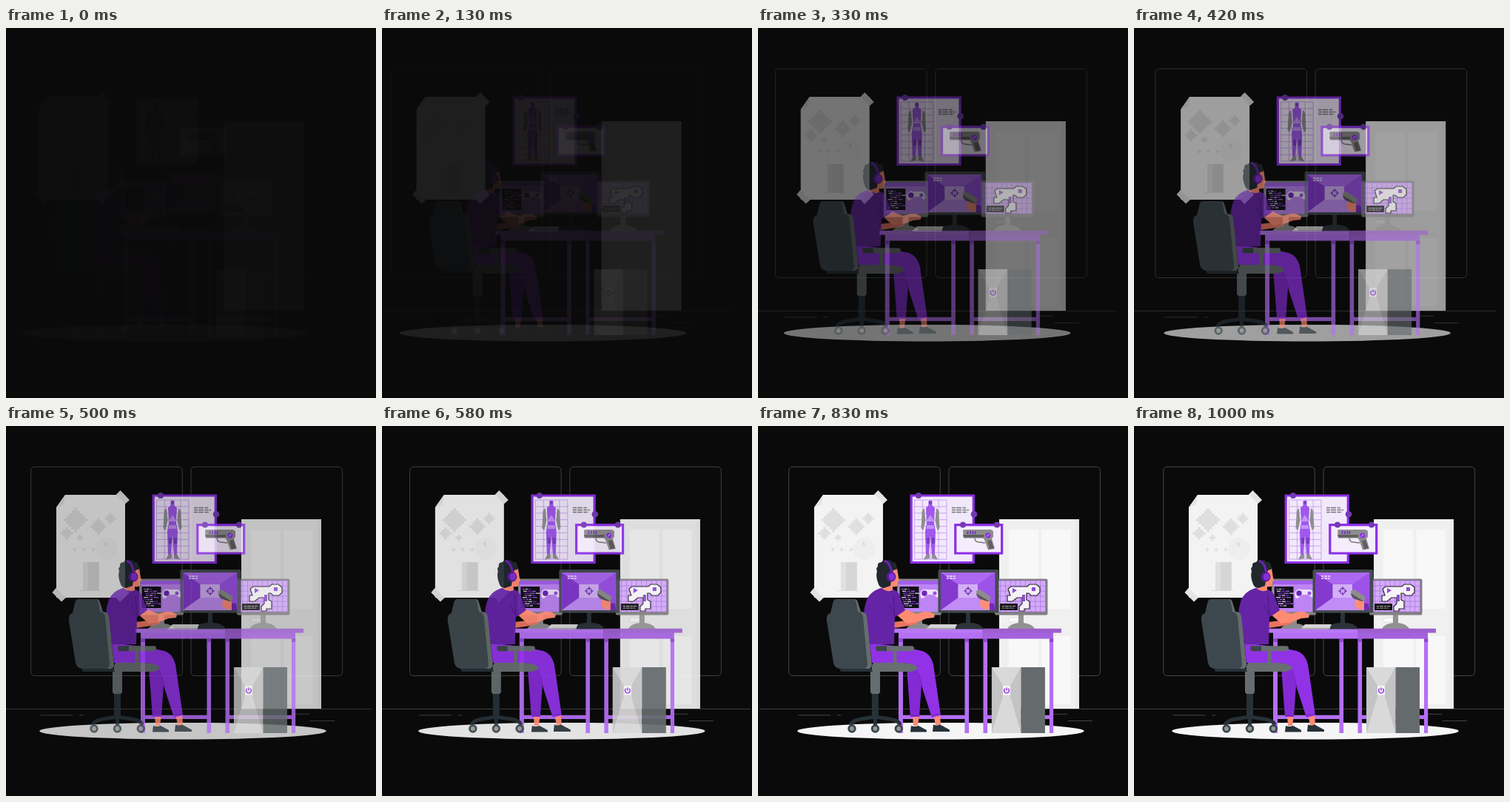
An HTML page that plays this animation: 500 px wide and 500 px high, repeating every 1040 ms.

```html
<!DOCTYPE html>
<html lang="en">
<head>
<meta charset="utf-8">
<title>Game designer at work</title>
<style>
html, body { margin: 0; width: 100%; height: 100%; overflow: hidden; background: #0a0a0a; }
svg { display: block; width: 100vw; height: 100vh; }
</style>
</head>
<body>
<svg viewBox="0 0 500 500">
  <g class="part" fill="none" stroke="#4c4c4c" stroke-width=".9">
    <rect x="39.7" y="55.2" width="204.6" height="282.3" rx="5"/>
    <rect x="256" y="55.2" width="204.6" height="282.3" rx="5"/>
    <path d="M0 382.4H500M52.5 390.8H96M105 390.8H110.5M396 389.3H416M417 398.5H450"/>
  </g>

  <ellipse class="part" cx="245" cy="412.2" rx="193.8" ry="11.3" fill="#f5f5f5"/>

  <g class="part">
    <path fill="#f0f0f0" d="M324 126H432V382H324Z"/>
    <path fill="#ebebeb" d="M427 126h5V382h-5Z"/>
    <path fill="#f8f8f8" d="M337 140.5h40V247H337ZM381.500 140.5H420.500V247H381.500ZM337 284h40v92H337ZM381.500 284H420.500v92H381.500Z"/>
    <path fill="#fafafa" stroke="#dedede" stroke-width=".8" d="M338 259h10q4 0 4 3t-4 3h-10q-3-3 0-6Z"/>
  </g>

  <g class="part">
    <path fill="#f3f3f3" d="M86 93H167V232H74V110Z"/>
    <path fill="#e4e4e4" d="M86 93L84 106 74 110Z"/>
    <g id="sprites" fill="#dfdfdf"></g>
    <circle cx="142" cy="166" r="15" fill="#eeeeee"/>
    <path fill="none" stroke="#d2d2d2" d="M143 157.500h-3v2h2v2h-3"/>
    <path fill="#e0e0e0" d="M110 184h22v38H110Z"/>
    <path fill="#d6d6d6" d="M117 184h14.500v38H117ZM105 222h29v.8h-29Z"/>
    <path fill="#e4e4e4" d="M155 92.500l5.500-5.500 12.500 13-5.500 5ZM68.500 225l5-6 13.500 13-6 5.500ZM155 232l12-13 6 6-13 13Z"/>
  </g>

  <g class="part">
    <path fill="#f2e8fb" stroke="#8b2fe6" stroke-width="3.200" d="M205.200 94H289.300V184.500H205.200Z"/>
    <g id="chart" stroke="#b98bea" stroke-width=".7"></g>
    <path stroke="#777" stroke-width="1.700" stroke-dasharray="5 1 7 1.500" d="M260 110.500h19M260 113.500h23M260 116.500h21"/>
    <g fill="#8f8f8f">
      <path d="M223 111q-4 2-3.500 10l-1 17 3 3 3-13ZM239 111q4 2 3.500 10l1 17-3 3-3-13ZM226 173h4v6l-8 1.500ZM233 173h4l4 7.500-8-1.500Z"/>
    </g>
    <path fill="#9f57ec" d="M228.500 101.500q2.500-2 5 0v6l3.500 3-1 20 2 12-1 31h-4l-2-26-2 26h-4l-1-31 2-12-1-20 3.500-3Z"/>
    <path fill="#c292f5" d="M231 120l6 9h-12ZM226 134h10v5h-10Z"/>
    <path fill="#7a3cc0" d="M226 151h4v8h-4ZM233 151h4v8h-4ZM229 102h4v3h-4Z"/>
    <circle cx="215" cy="94" r="4" fill="#733ab4"/><circle cx="290" cy="119.300" r="4.300" fill="#733ab4"/>
  </g>

  <g class="part">
    <path fill="#f5ecfc" stroke="#8b2fe6" stroke-width="3.200" d="M264.800 133.700H327.700V172H264.800Z"/>
    <path fill="#8d8d8d" d="M275 141l2-1h36l3 2v8l-2 2 4 14-9 1.500-5-14-2-2H276Z"/>
    <path fill="#5f5f5f" d="M275 147h28v3.500h-27ZM308 155l5-1 4 11-6 1.500Z"/>
    <path fill="none" stroke="#777" stroke-width="1.400" d="M291 151q0 6 6 6l8 1"/>
    <path stroke="#7427c4" stroke-width="1.500" d="M281 146l1-4M284.500 146l1-4M288 146l1-4M291 146l1-4"/>
    <circle cx="308.800" cy="147.800" r="3.600" fill="#8b2fe6"/>
    <path stroke="#eadafa" d="M307 149.500l3.500-3.500"/>
    <circle cx="275" cy="133.500" r="4" fill="#733ab4"/><circle cx="321" cy="133.500" r="4" fill="#733ab4"/>
  </g>

  <g class="part">
    <path fill="#8b8b8b" d="M212 254h8v13q10 1 14 7h-36q4-6 14-7Z"/>
    <rect x="186" y="206.500" width="60" height="49" rx="2" fill="#858585"/>
    <path fill="#bd85f3" d="M188 209h57v42h-57Z"/>
    <path fill="#a55ff0" d="M188 209h57v5h-57Z"/>
    <path fill="#111016" d="M189.500 217h26v29h-26Z"/>
    <g id="code" stroke-width="1.300"></g>
    <path fill="#eee1fa" d="M218 224q3-5 8-3h10q6-1 8 9l-3 2-6-4h-8l-6 5q-5 0-3-9Z"/>
    <circle cx="223" cy="226" r="3.700" fill="#6d25b9"/><circle cx="237" cy="226" r="2.500" fill="#9c50e5"/>
  </g>

  <g class="part">
    <path fill="#919191" d="M350 254h7v12q11 1 15 8h-37q4-7 15-8Z"/>
    <rect x="318" y="206.500" width="71.500" height="49" rx="2" fill="#818181"/>
    <path fill="#d3abf8" d="M319 209h67.500v42H319Z"/>
    <g id="grid" stroke="#a367df" stroke-width=".6"></g>
    <path fill="#f6f3f8" stroke="#2c2632" stroke-width="1.200" d="M336 220l4-3h22l3-3h9l5 4v7l-4 4h-8l-3-3h-3v9l4 2v10h-7v3h-7v-6l4-4v-8h-7l-6 5h-7v-8h4Z"/>
    <path fill="#8c4bd0" d="M342 219l6 3-6 4ZM355 228h4v9h-4ZM368 218h5v5h-5Z"/>
    <path fill="#171419" d="M325 240h24v9h-24Z"/>
    <path stroke="#aaa" stroke-dasharray="3 1 5 1" d="M328 243.500h18M328 246h16"/>
  </g>

  <g class="part">
    <path fill="#b46ff4" d="M188 279h114v8.500H188ZM188 287h6v128h-6ZM277.500 287h5.600v128h-5.600ZM302.500 287h5.600v128h-5.600ZM392 287h5.200v128H392ZM194 390.700h84v5.300h-84ZM308 390.700h84v5.300h-84Z"/>
    <path fill="#9149d2" d="M188 287h6v5h-6ZM277.500 287h5.600v5h-5.600ZM302.500 287h5.600v5h-5.600ZM392 287h5.200v5H392Z"/>
    <path fill="#a461dd" d="M302 279h95v8.500h-95Z"/>
    <path fill="#b878f4" d="M180.500 273.700H302v5.800H180.500Z"/>
    <path fill="#9d60cf" d="M302 273.700H408v5.800H302Z"/>
  </g>

  <g class="part">
    <path fill="#2b3339" d="M279 251h6v15q14 0 18 8.500h-42q4-8.500 18-8.500Z"/>
    <rect x="241.500" y="194" width="82" height="58.500" rx="2" fill="#444a4f"/>
    <path fill="#9d52e9" d="M245 198h73.500v51H245Z"/>
    <path fill="#8439cf" d="M245 198l23.500 16v18L245 249Z"/>
    <path fill="#ad68f1" d="M245 198h73.500L295 214h-26.500Z"/>
    <path fill="#c18cf5" d="M245 249l23.500-17H295l23.500 17Z"/>
    <path fill="#d2b0f5" d="M268.500 214H295v18h-26.500Z"/>
    <path stroke="#eee2fa" stroke-width="1.500" stroke-dasharray="3 1 4 1" d="M253 203h13M253 206h13"/>
    <g fill="none" stroke="#6f2ab5" stroke-width="1.200"><circle cx="282" cy="223" r="3.700"/><path d="M282 217v4.500M282 224.500v4.500M276 223h4.500M283.500 223h4.500"/></g>
    <path fill="#8d8d8d" d="M293 223l5-2 15 10-3 8-5 1-11-11Z"/>
    <path fill="#555" d="M293 226l16 10-2 4-13-10Z"/>
    <path fill="#ff8e78" d="M299 234l6 2 7 2 1 10h-9l-6-5Z"/>
    <path fill="#742ab9" d="M311 239l6 1 1.500 9H311Z"/>
  </g>

  <g class="part">
    <path fill="#d4d4d4" d="M231 268h36l-3 6.500h-39Z"/>
    <path fill="#a0a0a0" d="M225 273h40v1.500h-40Z"/>
  </g>

  <g class="part">
    <path fill="#d9d9d9" d="M314 326h39.500v89H314Z"/>
    <path fill="#c4c4c4" d="M314 326l15 25v14L314 415ZM353.500 326L339 351v14l14.500 50Z"/>
    <path fill="#656b6d" d="M353.500 326H386v89h-32.500Z"/>
    <path fill="#f8f4fb" d="M329 351h10v12.500h-10Z"/>
    <path fill="none" stroke="#8b2fe6" stroke-width="1.400" d="M332 354.700a3.400 3.400 0 1 0 4 0M334 353.500v4"/>
  </g>

  <g class="part">
    <!-- chair base -->
    <path fill="#263138" d="M152 360h9v34h-9Z"/>
    <path fill="none" stroke="#263138" stroke-width="5" d="M123 404q2-6 14-8l19-3 20 3q13 2 14 8M156.500 392v13"/>
    <g fill="#8f9799" stroke="#3b4449" stroke-width="2.800"><circle cx="125" cy="409" r="4.300"/><circle cx="156.500" cy="409" r="4.300"/><circle cx="188.300" cy="409" r="4.300"/></g>
    <path fill="#656d6f" d="M150 331h13v29l-2 2h-9l-2-2Z"/>
    <!-- legs -->
    <path fill="#ff8b73" d="M207 391h9l-2 14h-6ZM235 389h9l1 15h-7Z"/>
    <path fill="#263138" d="M205 405q5 2 10 0l11 6v2.500h-22ZM235 403.500q5 2 9 0l13 7v2.500h-23Z"/>
    <path fill="#842ad4" d="M183 310l25 5 12 21-4 57h-12l-5-67Z"/>
    <path fill="#9132e7" d="M149 293l48 6 23 5q11 3 15 18l10 69-12 3-20-62-15-12h-46Z"/>
    <path fill="none" stroke="#6d20b3" d="M198 320q14 4 18 17l4 16M205 391l11 1M232 391.500l12-2.500"/>
    <!-- arms and torso -->
    <path fill="#e97462" d="M181 265l16-2 14 1 3 3-12 3-20 3Z"/>
    <path fill="#ff8b73" d="M183 253l12-6 17 7 10-3h8l7 4-1 4-10 1-13 5-14 2Z"/>
    <path fill="#6424a5" d="M164 219q-16 5-20 19-5 15-1 30l7 27h32l1-37 4-2 10-7-8-21q-2-5-10-8Z"/>
    <path fill="none" stroke="#50188b" d="M181 229l2 28M175 241l8 15"/>
    <!-- head -->
    <path fill="#ff8b73" d="M169 208l10-18 7 2 2 13 1 4-2 1v5q-1 3-7 2v5q-7 3-14-2Z"/>
    <path fill="#20282e" d="M160 211q-3-8-1-15-2-4 1-6-1-6 5-6 2-4 7-2 5-3 7 2 6-1 6 5l2 4-6 2-2 8-2 13-9 3q-6 0-8-8Z"/>
    <path fill="none" stroke="#6c22b6" stroke-width="3" d="M169 182q9 3 10 20"/>
    <ellipse cx="178" cy="203.800" rx="6.500" ry="6.800" fill="#59199a"/>
    <ellipse cx="179" cy="203.800" rx="4.200" ry="5" fill="#8430d5"/>
    <!-- chair seat and back -->
    <path fill="#263138" d="M108 328h55v4h-53Z"/>
    <path fill="#676f70" d="M154 320h38q16 0 22 6-2 6-14 6h-47q-3-6 1-12ZM180.500 303h5v24h-5ZM158 297.300h48q3 0 3 3.500t-3 3.500h-47q-3-3-1-7Z"/>
    <path fill="#3d464a" d="M158 297.300h14v7h-13q-3-3-1-7Z"/>
    <path fill="#656d6e" d="M128 234q4 0 5 4l4 13q7 0 8 6l7 65q0 6-5 6h-16Z"/>
    <path fill="#3d484e" d="M104 234h22q4 0 5 5l2 12q6 1 7 7l6 64q0 6-6 6h-30q-8 0-10-8l-9-57q-1-9 5-10l3-13q1-6 5-6Z"/>
  </g>
</svg>
<script>
const $ = id => document.getElementById(id);
const path = d => `<path d="${d}"/>`;

// Stepped pixel diamonds: centre, radius, pixel size
const sprites = [[100, 127, 4, 3.6], [131, 136, 3, 3.2], [147, 125, 2, 3], [88, 145, 2, 3.4], [106, 151, 1, 2.8],
  [99, 167, 1, 1.7], [111, 167, 1, 1.7], [124, 167, 1, 1.7]];
$('sprites').innerHTML = sprites.map(([cx, cy, r, s]) => {
  let d = '';
  for (let row = -r; row <= r; row++) {
    const half = (r - Math.abs(row) + .5) * s;
    d += `M${cx - half} ${cy + (row - .5) * s}h${half * 2}v${s}h${-half * 2}Z`;
  }
  return path(d);
}).join('');

function lattice(x, y, w, h, cols, rows) {
  let d = '';
  for (let i = 0; i <= cols; i++) d += `M${x + w * i / cols} ${y}v${h}`;
  for (let i = 0; i <= rows; i++) d += `M${x} ${y + h * i / rows}h${w}`;
  return `<path fill="none" d="${d}"/>`;
}
$('chart').innerHTML = lattice(209.500, 100, 43.500, 80, 4, 9);
$('grid').innerHTML = lattice(319, 209, 67.500, 42, 10, 6);

const inks = ['#a45bed', '#d9cbe8', '#7630bd'];
let code = '';
for (let row = 0; row < 9; row++) {
  let x = 192 + row * 5 % 4;
  for (let i = 0; i < 3; i++) {
    const w = 3 + (row * 7 + i * 5) % 5;
    code += `<path stroke="${inks[(row + i) % 3]}" d="M${x} ${220.500 + row * 2.800}h${w}"/>`;
    x += w + 1;
  }
}
$('code').innerHTML = code;

const LOOP = 1040, FPS = 24, LEAD = 30, SLIDE = 1000, SHIFT = -30;
const parts = document.querySelectorAll('.part');
const cubic = (a, b, u) => 3 * (1 - u) ** 2 * u * a + 3 * (1 - u) * u * u * b + u ** 3;

// cubic-bezier(.36, -.01, .5, 1.38)
function ease(p) {
  if (p >= 1) return 1;
  let lo = 0, hi = 1;
  for (let i = 0; i < 24; i++) {
    const mid = (lo + hi) / 2;
    if (cubic(.36, .5, mid) < p) lo = mid; else hi = mid;
  }
  return cubic(-.01, 1.38, lo);
}

// Picture steps fall on hundredths of a second; the first one lasts double.
function stepAt(t) {
  let k = Math.floor(t * FPS / 1000) + 1;
  while (k > 1 && Math.round(k * 100 / FPS) * 10 > t) k--;
  return Math.min(k, 24);
}

function draw(t) {
  const y = ease((stepAt(t) * 1000 / FPS + LEAD) / SLIDE);
  for (const part of parts) {
    part.setAttribute('transform', `translate(${SHIFT * (1 - y)} 0)`);
    part.setAttribute('opacity', Math.max(0, Math.min(1, y)));
  }
}

const start = performance.now();
function tick() {
  draw((performance.now() - start) % LOOP);
  requestAnimationFrame(tick);
}
tick();
</script>
</body>
</html>
```
